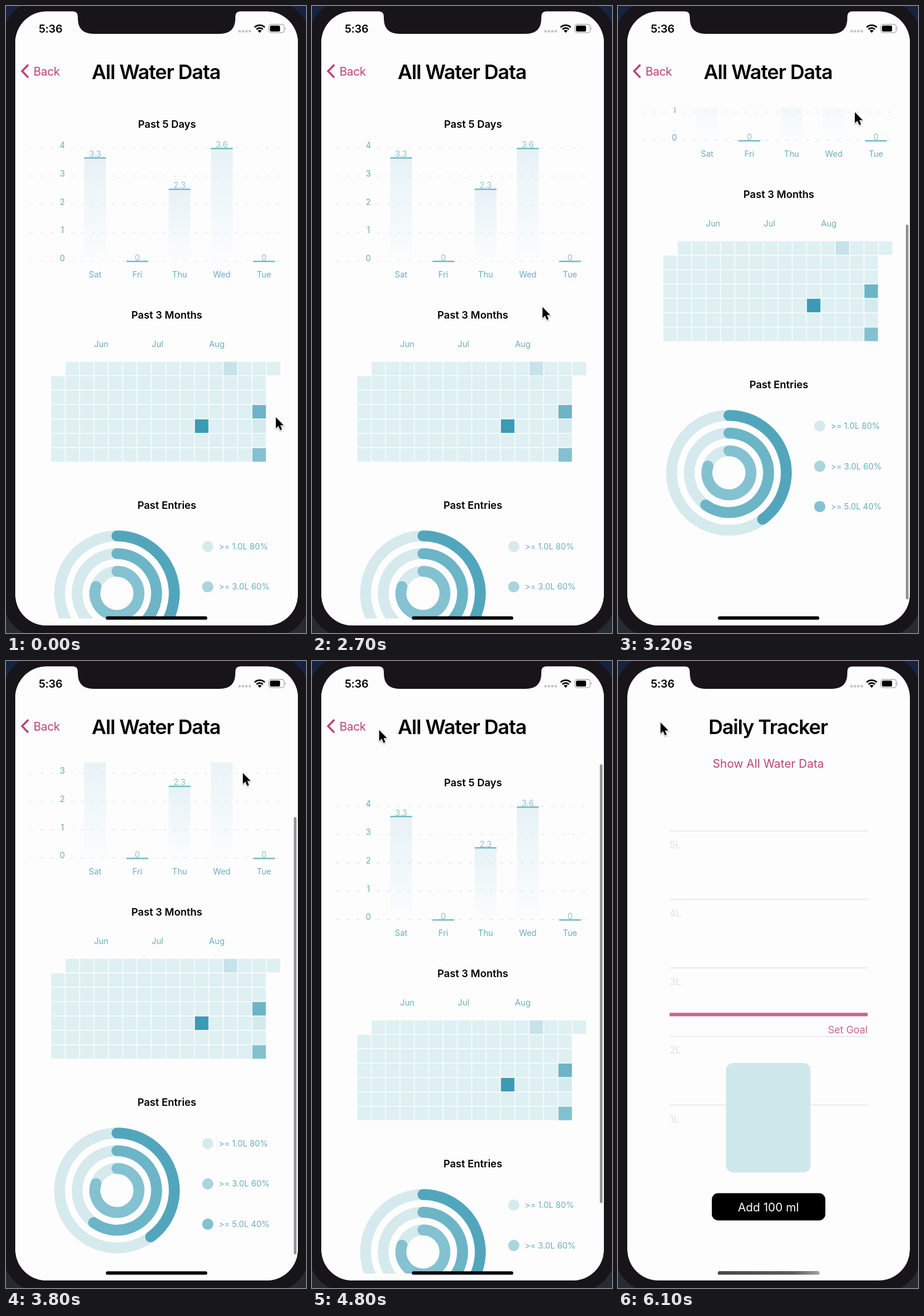
These frames come from a looping animation (518x1081 px, 6400 ms). An HTML page:

```html
<!DOCTYPE html>
<html lang="en">
<head>
<meta charset="utf-8">
<title>Water tracker</title>
<style>
  html, body { margin: 0; width: 100%; height: 100%; overflow: hidden; background: #17151a; }
  svg { display: block; width: 100vw; height: 100vh; }
  text { font-family: Inter, Roboto, "Liberation Sans", sans-serif; font-variant-ligatures: none; font-feature-settings: "calt" 0; }
  .mid { text-anchor: middle; }
  .title { font-size: 34.5px; font-weight: 600; letter-spacing: -.03em; text-anchor: middle; }
  .head { font-size: 17.7px; font-weight: 600; text-anchor: middle; }
  .small { font-size: 14.2px; fill: #67adbd; }
  .value { font-size: 14.2px; fill: #8cc3d0; text-anchor: middle; }
  .level { font-size: 17px; fill: #e2e1e7; }
  .pink { fill: #b8476f; }
</style>
</head>
<body>
<svg viewBox="0 0 518 1081">
  <defs>
    <clipPath id="screenClip"><rect x="16" y="9.5" width="488" height="1058.5" rx="54"/></clipPath>
    <clipPath id="scrollClip"><rect x="16" y="175" width="488" height="881"/></clipPath>
    <linearGradient id="desk" x1="0" y1="0" x2="0" y2="1">
      <stop offset="0" stop-color="#15233f"/><stop offset="1" stop-color="#262a33"/>
    </linearGradient>
    <linearGradient id="barFill" x1="0" y1="0" x2="0" y2="1">
      <stop offset="0" stop-color="#e7f2f6"/><stop offset="1" stop-color="#fbfdfe"/>
    </linearGradient>
    <linearGradient id="homeFill">
      <stop offset="0" stop-color="#484749"/><stop offset=".75" stop-color="#5c5b5d"/><stop offset="1" stop-color="#a3a2a4"/>
    </linearGradient>
    <filter id="soft" x="-50%" y="-50%" width="200%" height="200%">
      <feDropShadow dx="0" dy="1.5" stdDeviation="1.3" flood-opacity=".35"/>
    </filter>
  </defs>

  <rect width="518" height="1081" fill="url(#desk)"/>
  <rect x="-7" y="-12" width="532" height="1102" rx="72" fill="#17151a"/>

  <g clip-path="url(#screenClip)">
    <rect x="16" y="9" width="488" height="1060" fill="#fefdfe"/>

    <g id="tracker">
      <text class="mid pink" x="259.5" y="183.5" font-size="20">Show All Water Data</text>
      <g id="levels"></g>
      <rect x="89" y="606.5" width="342" height="6" fill="#c8668b"/>
      <text x="431" y="641.5" font-size="17.2" text-anchor="end" fill="#c8668b">Set Goal</text>
      <rect x="186.5" y="693" width="146" height="188.7" rx="12" fill="#cfe8ec"/>
      <rect x="162" y="917.5" width="196" height="47" rx="11"/>
      <text class="mid" x="259.7" y="948.5" font-size="20" fill="#fff">Add 100 ml</text>
    </g>

    <g id="data">
      <rect x="16" y="9" width="488" height="1060" fill="#fefdfe"/>
      <g clip-path="url(#scrollClip)">
        <g id="scroll">
          <text class="head" x="278" y="210">Past 5 Days</text>
          <g id="chart"></g>
          <text class="head" x="277.7" y="538.5">Past 3 Months</text>
          <g id="heat"></g>
          <text class="head" x="277.7" y="866.5">Past Entries</text>
          <g id="rings"></g>
        </g>
      </g>
      <rect id="thumb" x="497" width="4.6" rx="2.3" fill="#929194"/>
    </g>

    <text id="newTitle" class="title" x="259" y="125.5">Daily Tracker</text>
    <text id="oldTitle" class="title" x="259" y="125.5">All Water Data</text>
    <g id="back">
      <path d="M38.5 101.2 L27.8 112.3 L38.5 123.4" fill="none" stroke="#bd426f" stroke-width="3.4"/>
      <text x="47.5" y="119.7" font-size="20" letter-spacing="-.3" fill="#bd426f">Back</text>
    </g>

    <text x="56.5" y="45.7" font-size="19" font-weight="600" letter-spacing="-.3">5:36</text>
    <g fill="#c6c5c8">
      <circle cx="403.3" cy="43.5" r="2.3"/><circle cx="409.2" cy="43.5" r="2.3"/>
      <circle cx="415.1" cy="43.5" r="2.3"/><circle cx="421" cy="43.5" r="2.3"/>
    </g>
    <path d="M429.3 36.8 A12.3 12.3 0 0 1 446.7 36.8 M432.5 40.2 A7.8 7.8 0 0 1 443.5 40.2" fill="none" stroke="#000" stroke-width="2.7"/>
    <path d="M438 46.2 L434.6 42.6 A4.7 4.7 0 0 1 441.4 42.6 Z"/>
    <rect x="453.8" y="31.7" width="26.6" height="14.2" rx="4" fill="none" stroke="#a09fa2" stroke-width="1.2"/>
    <rect x="455.8" y="33.7" width="17.4" height="10.2" rx="2.2"/>
    <path d="M482 36.3 Q484 38.8 482 41.3 Z" fill="#a09fa2"/>
    <rect x="172.5" y="1052.3" width="175" height="5.8" rx="2.9"/>
    <rect id="homeGrey" x="172.5" y="1052.3" width="175" height="5.8" rx="2.9" fill="url(#homeFill)"/>
  </g>

  <path d="M115 9 Q124 9.5 124 18 V21 Q124 48 151 48 H369 Q396 48 396 21 V18 Q396 9.5 405 9 Z" fill="#17151a"/>

  <path id="cursor" d="M0 0 V19 L4.3 15 L7.5 22.2 L10.6 20.8 L7.6 13.8 H13.4 Z" stroke="#fff" stroke-width="1.6" paint-order="stroke" filter="url(#soft)"/>
</svg>

<script>
const $ = id => document.getElementById(id);
const SVG = "http://www.w3.org/2000/svg";

function add(parent, tag, attrs, text) {
  const el = document.createElementNS(SVG, tag);
  for (const k in attrs) el.setAttribute(k, attrs[k]);
  if (text !== undefined) el.textContent = text;
  $(parent).append(el);
}

function buildChart() {
  const days = [["Sat", 3.3, 262], ["Fri", 0, 440.3], ["Thu", 2.3, 316], ["Wed", 3.6, 245.8], ["Tue", 0, 440.3]];
  days.forEach(([, , top], i) => {
    if (top < 440) add("chart", "rect", { x: 135 + 72.9 * i, y: top, width: 37.8, height: 440 - top, fill: "url(#barFill)" });
  });
  for (let n = 0; n <= 4; n++) {
    const y = 439.5 - 48.75 * n;
    add("chart", "line", { x1: 41, x2: 473, y1: y, y2: y, stroke: "#d8e8ee", "stroke-width": 1.2, "stroke-dasharray": "5.9 11.8" });
    add("chart", "text", { class: "small mid", x: 97.3, y: y + .7 }, n);
  }
  days.forEach(([day, value, top], i) => {
    const x = 153.9 + 72.9 * i;
    add("chart", "rect", { x: x - 18.9, y: top - 1.2, width: 37.8, height: 2.4, fill: "#72b9c8" });
    add("chart", "text", { class: "value", x, y: top - 1.6 }, value);
    add("chart", "text", { class: "small mid", x, y: 468.3 }, day);
  });
}

function buildHeat() {
  const special = { "0,12": "#c6e2ea", "3,14": "#6cb5c6", "4,10": "#3a9bb3", "4,14": "#d4eaef", "6,14": "#83c1d0" };
  [["Jun", 164.5], ["Jul", 261.5], ["Aug", 364]].forEach(([m, x]) =>
    add("heat", "text", { class: "small mid", x, y: 587.7 }, m));
  for (let row = 0; row < 7; row++) {
    for (let i = 0; i < 15; i++) {
      const col = row ? i : i + 1;
      add("heat", "rect", {
        x: 78.2 + 24.8 * col, y: 613.4 + 24.8 * row, width: 23.4, height: 23.4,
        fill: special[row + "," + col] || "#def0f2"
      });
    }
  }
}

function buildRings() {
  const cx = 191.5, cy = 1012.7;
  [[99, .4, "#52a6bc"], [68.5, .6, "#6cb5c6"], [38, .8, "#84c1d1"]].forEach(([r, part, color]) => {
    const a = part * 2 * Math.PI;
    const ring = { fill: "none", "stroke-width": 18.8 };
    add("rings", "circle", { ...ring, cx, cy, r, stroke: "#d6eaee" });
    add("rings", "path", {
      ...ring, stroke: color, "stroke-linecap": "round",
      d: `M${cx} ${cy - r} A${r} ${r} 0 ${+(part > .5)} 1 ${cx + r * Math.sin(a)} ${cy - r * Math.cos(a)}`
    });
  });
  [["1.0L 80%", "#d6eaee"], ["3.0L 60%", "#aad5de"], ["5.0L 40%", "#84c1d1"]].forEach(([label, fill], i) => {
    const y = 932 + 69.4 * i;
    add("rings", "circle", { cx: 348.4, cy: y, r: 9.7, fill });
    add("rings", "text", { class: "small", x: 367.5, y: y + 5 }, ">= " + label);
  });
}

function buildLevels() {
  for (let n = 1; n <= 5; n++) {
    const y = 293 + 118.15 * (5 - n);
    add("levels", "line", { x1: 89, x2: 431, y1: y, y2: y, stroke: "#e4e3e8", "stroke-width": 1.5 });
    add("levels", "text", { class: "level", x: 89, y: y + 30 }, n + "L");
  }
}

const LOOP = 6400, STEP = 100;
const MAX = 91, VIEW = 880;

// Pointer path: time, x, y
const PATH = [
  [1600, 466, 709], [1700, 463, 700], [1900, 430, 610], [2100, 401, 528], [2200, 398, 519],
  [2700, 398, 519], [2800, 399, 503], [2900, 402, 430], [3000, 406, 310], [3100, 408, 215],
  [3200, 409, 183], [3500, 409, 183], [3800, 409, 193], [3900, 408, 233], [4000, 404, 378],
  [4100, 400.5, 476], [4200, 399, 505], [4400, 398, 508], [4600, 290, 330], [4800, 116, 119],
  [4950, 81, 108], [5100, 73.5, 106]
];

const clamp = (v, lo = 0, hi = 1) => Math.min(hi, Math.max(lo, v));
const ramp = (t, from, to) => clamp((t - from) / (to - from));
const settle = (t, start, speed) => {
  const x = Math.max(0, t - start) / 1000 * speed;
  return (1 + x) * Math.exp(-x);
};

function pointer(t) {
  const i = PATH.findIndex(k => k[0] > t);
  if (i === 0) return PATH[0].slice(1);
  if (i < 0) return PATH[PATH.length - 1].slice(1);
  const a = PATH[i - 1], b = PATH[i], p = ramp(t, a[0], b[0]);
  return [a[1] + (b[1] - a[1]) * p, a[2] + (b[2] - a[2]) * p];
}

// Past either end the content follows the finger with growing resistance
function rubber(raw) {
  const inside = clamp(raw, 0, MAX), over = raw - inside;
  return inside + Math.sign(over) * VIEW * (1 - 1 / (Math.abs(over) * .55 / VIEW + 1));
}

const firstDrag = t => rubber(519 - pointer(t)[1]);
const secondDrag = t => rubber(332 - pointer(t)[1]);

function offsetAt(t) {
  if (t < 2700) return 0;
  if (t < 3350) return firstDrag(t);
  if (t < 3900) return MAX + (firstDrag(3350) - MAX) * settle(t, 3350, 9.4);
  if (t < 4350) return secondDrag(t);
  return secondDrag(4350) * settle(t, 4350, 9.6);
}

const move = (id, x, y = 0) => $(id).setAttribute("transform", `translate(${x} ${y})`);
const fade = (id, v) => $(id).setAttribute("opacity", v);

function draw(time) {
  const t = Math.floor(time % LOOP / STEP) * STEP;

  const offset = offsetAt(t), inside = clamp(offset, 0, MAX), over = offset - inside;
  move("scroll", 0, -offset);
  $("thumb").setAttribute("y", 178 + inside / MAX * 82 + Math.max(0, over));
  $("thumb").setAttribute("height", 763 - Math.abs(over));
  fade("thumb", ramp(t, 2700, 2850) * (1 - ramp(t, 5100, 5400)));

  const pop = t >= 6000 ? 1 : 1 - settle(t, 5430, 13);
  move("data", 490 * pop);
  move("tracker", -146 * (1 - pop));
  move("oldTitle", 245 * pop);
  move("newTitle", -190 * (1 - pop));
  fade("oldTitle", clamp(1 - pop * 1.4));
  fade("newTitle", clamp(pop * 1.6 - .6));
  fade("back", (t >= 5300 ? .35 : 1) * clamp(1 - pop * 2));
  fade("homeGrey", ramp(t, 5600, 6100));

  move("cursor", ...pointer(t));
}

buildChart();
buildHeat();
buildRings();
buildLevels();

function tick() {
  draw(performance.now());
  requestAnimationFrame(tick);
}
tick();
</script>
</body>
</html>
```
